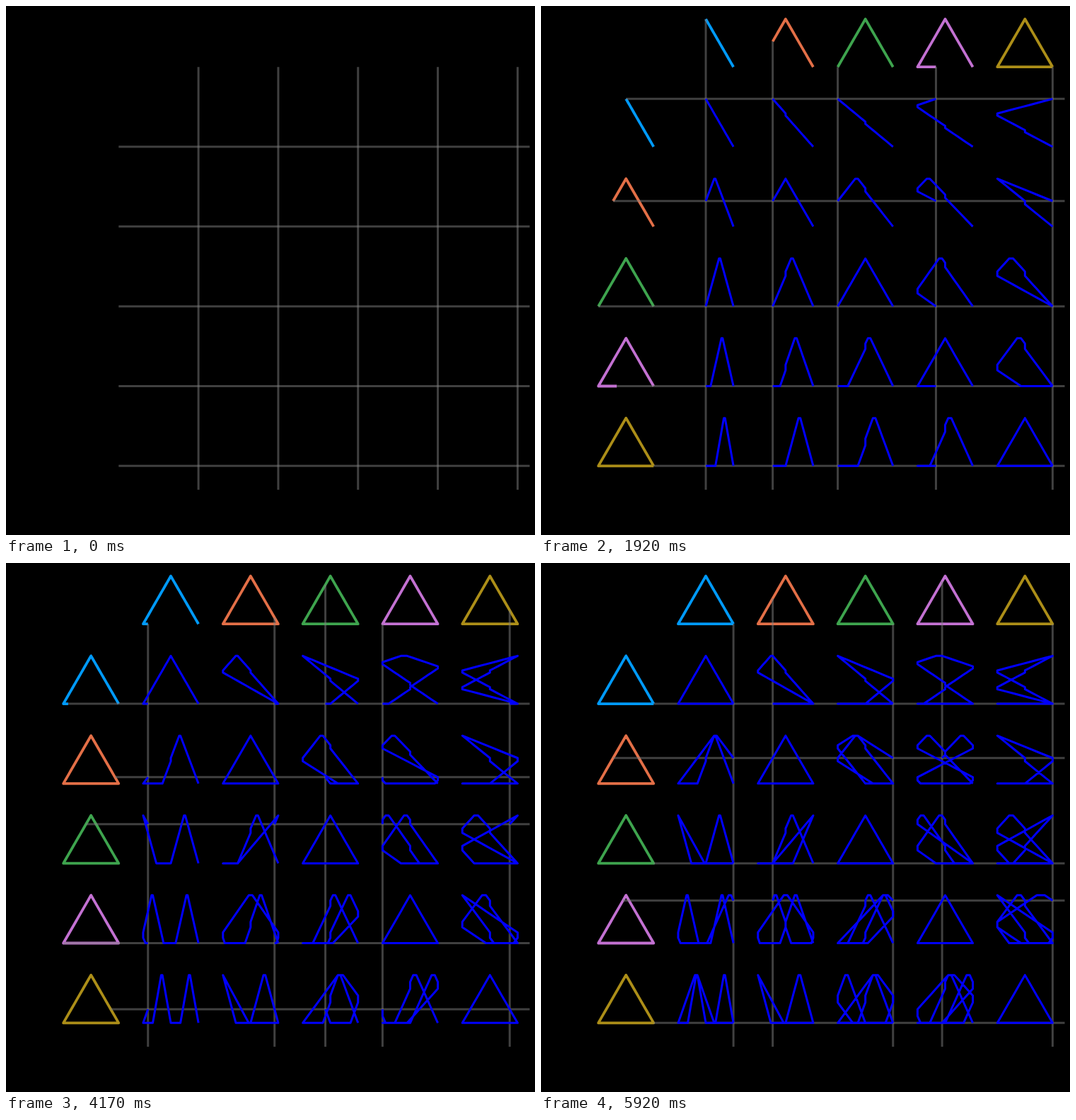
An HTML page with a canvas that plays this animation: 748 px wide and 748 px high, repeating every 6010 ms.

```html
<!DOCTYPE html>
<html lang="en">
<head>
<meta charset="utf-8">
<title>Triangle Lissajous table</title>
<style>
  html, body { margin: 0; width: 100%; height: 100%; overflow: hidden; background: #000; }
  canvas { display: block; }
</style>
</head>
<body>
<canvas id="stage" width="748" height="748"></canvas>
<script>
const ctx = document.getElementById('stage').getContext('2d');
const LOOP = 6010, FPS = 12, STEPS = 72;
const RADIUS = 45.13, PITCH = 2.5 * RADIUS;
const LEFT = 120.2, TOP = 63.65, RIGHT_END = 740.5, BOTTOM_END = 684;
const curves = [
  { color: '#009afa', samples: 24 },
  { color: '#e36f47', samples: 16 },
  { color: '#3ea44e', samples: 12 },
  { color: '#c371d2', samples: 10 },
  { color: '#ac8e18', samples: 8 }
];

const centerX = col => LEFT + col * PITCH;
const centerY = row => TOP + row * PITCH;

const corner = i => {
  const angle = Math.PI / 6 + i * 2 * Math.PI / 3;
  return { x: RADIUS * Math.cos(angle), y: RADIUS * Math.sin(angle) };
};
// Bottom right, apex, bottom left.
const corners = [corner(0), corner(2), corner(1)];

// Each side includes both of its end points, so corners are sampled twice.
function trianglePoint(samples, step) {
  const side = Math.floor(step / samples) % 3;
  const f = step % samples / (samples - 1);
  const a = corners[side], b = corners[(side + 1) % 3];
  return { x: a.x + (b.x - a.x) * f, y: a.y + (b.y - a.y) * f };
}

for (const curve of curves)
  curve.points = Array.from({ length: STEPS }, (_, i) => trianglePoint(curve.samples, i));

function strokePath(points, color, width) {
  ctx.beginPath();
  for (const [x, y] of points) ctx.lineTo(x, y);
  ctx.strokeStyle = color;
  ctx.lineWidth = width;
  ctx.stroke();
}

function trail(col, row, xCurve, yCurve, step, color, width) {
  const points = [];
  for (let i = 0; i <= step; i++)
    points.push([centerX(col) + xCurve.points[i].x, centerY(row) + yCurve.points[i].y]);
  strokePath(points, color, width);
}

function draw(step) {
  ctx.fillStyle = '#000';
  ctx.fillRect(0, 0, 748, 748);
  ctx.lineJoin = 'round';
  ctx.lineCap = 'butt';

  curves.forEach((curve, i) => {
    trail(i + 1, 0, curve, curve, step, curve.color, 3.8);
    trail(0, i + 1, curve, curve, step, curve.color, 3.8);
  });

  const gray = 'rgba(128,128,128,0.5)';
  curves.forEach((curve, i) => {
    const p = curve.points[step];
    const x = centerX(i + 1) + p.x, y = centerY(i + 1) + p.y;
    strokePath([[x, centerY(0) + p.y], [x, BOTTOM_END]], gray, 3);
    strokePath([[centerX(0) + p.x, y], [RIGHT_END, y]], gray, 3);
  });

  curves.forEach((xCurve, col) => curves.forEach((yCurve, row) =>
    trail(col + 1, row + 1, xCurve, yCurve, step, '#00f', 3)));
}

function tick() {
  // Steps fall on the nearest 10 ms.
  const t = Math.floor(performance.now() % LOOP / 10) * 10 + 5;
  draw(Math.min(STEPS - 1, Math.floor(t * FPS / 1000)));
  requestAnimationFrame(tick);
}
tick();
</script>
</body>
</html>
```
